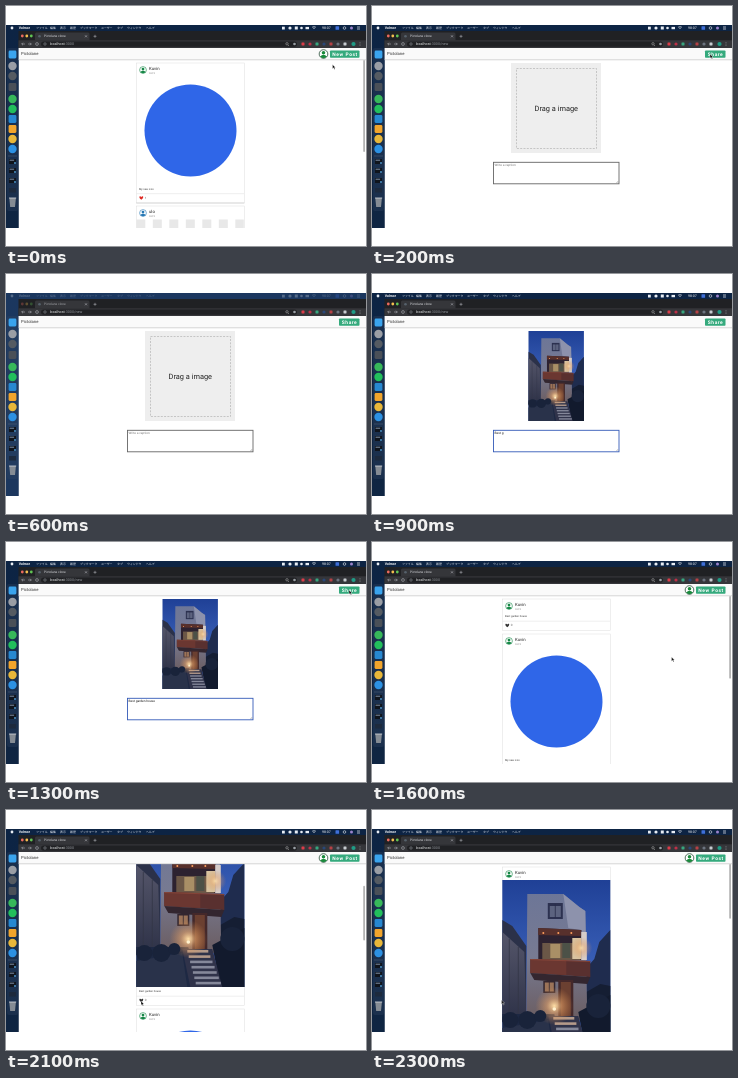
Recreate the animation shown at these times as an HTML page. Size 360 by 240 pixels, loop 2400 ms.

```html
<!DOCTYPE html>
<html lang="ja">
<head>
<meta charset="utf-8">
<title>Photo feed demo</title>
<style>
  html, body { margin: 0; width: 100%; height: 100%; overflow: hidden; background: #fff; }
  svg { display: block; width: 360px; height: 240px; }
  text { font-family: Roboto, "Noto Sans CJK JP", "Noto Sans CJK", sans-serif; text-rendering: geometricPrecision; }
  .mid { text-anchor: middle; }
  .bold { font-weight: 700; }
</style>
</head>
<body>
<svg id="stage" viewBox="0 0 360 240" xmlns="http://www.w3.org/2000/svg"></svg>
<script>
const STEP = 100, STEPS = 24;
const stage = document.getElementById('stage');

// Markup helpers
const rect = (x, y, w, h, fill, more = '') => `<rect x="${x}" y="${y}" width="${w}" height="${h}" fill="${fill}" ${more}/>`;
const dot = (x, y, r, fill, more = '') => `<circle cx="${x}" cy="${y}" r="${r}" fill="${fill}" ${more}/>`;
const poly = (points, fill) => `<polygon points="${points}" fill="${fill}"/>`;
const line = (d, stroke, w = .6) => `<path d="${d}" fill="none" stroke="${stroke}" stroke-width="${w}"/>`;
const text = (x, y, size, fill, str, cls = '', more = '') =>
  `<text x="${x}" y="${y}" font-size="${size}" fill="${fill}" class="${cls}" ${more}>${str}</text>`;
const group = (id, body, more = '') => `<g id="${id}" ${more}>${body}</g>`;
const stops = colors => colors.map((c, i) => `<stop offset="${i / (colors.length - 1)}" stop-color="${c}"/>`).join('');
const gradient = (id, ...colors) => `<linearGradient id="${id}" x2="0" y2="1">${stops(colors)}</linearGradient>`;

const avatar = (x, y, r, color, ring = color) =>
  dot(x, y, r * .92, '#fff', `stroke="${ring}" stroke-width="${r * .16}"`) + dot(x, y - r * .25, r * .38, color) +
  `<path d="M${x - r * .72} ${y + r * .55}Q${x} ${y - r * .2} ${x + r * .72} ${y + r * .55}Q${x} ${y + r * 1.25} ${x - r * .72} ${y + r * .55}" fill="${color}"/>`;

const heart = (x, y, id = '', fill = '#333') =>
  `<path id="${id}" transform="translate(${x} ${y})" d="M0 1.8C-3.4-.4-1.6-2.8 0-1C1.6-2.8 3.4-.4 0 1.8Z" fill="${fill}"/>`;

// Evening house, 108 x 174
function house() {
  let s = rect(0, 0, 108, 174, 'url(#sky)');
  // neighbours
  s += poly('0,40 10,46 24,66 24,142 0,142', '#2b3149') + poly('0,52 22,72 24,142 0,142', 'url(#side)');
  s += line('M7 59V140M16 67V140', '#343747', .8);
  s += poly('84,88 92,79 97,62 108,50 108,174 84,174', '#1f2c4e') + poly('84,112 98,104 108,106 108,174 84,174', '#151e33');
  // facade
  s += poly('25,14 61,14 77,27 83,31 85,140 24,140', 'url(#wall)');
  s += poly('61,14 77,27 83,31 84,80 78,80 78,50 66,48', '#8d92ac');
  s += rect(45.5, 23, 15, 16, '#2c3150') + rect(47.5, 26, 11, 11, '#5c637f') + line('M53 24V38', '#2a2e4b', .8);
  // lit balcony
  s += poly('36,48 79,50 79,80 36,80', '#2d2230') + poly('36,48 79,50 79,56 36,55', '#57302c');
  s += rect(40, 63, 38, 17, '#6b5747') + rect(48, 64, 10, 14, '#a98f66') + rect(60, 63, 8, 15, '#4c5147');
  s += rect(70, 58, 9, 21, '#d8c3a0') + rect(79, 52, 5.5, 28, '#d6cdc9') + dot(79, 68, 11, 'url(#glow)', 'opacity=".8"');
  for (const x of [41, 56, 69]) s += dot(x, 53, 1, '#ff9e5c');
  s += poly('28,79 88,81 88,97 28,93', '#59302f') + poly('28,79 64,80 64,95 28,93', '#6b3731');
  s += line('M28 79.5L88 81.5', '#8d4a3c', .8) + poly('28,93 88,97 85,104 32,100', '#33262f');
  // ground floor
  s += rect(41, 101, 12, 12, '#33262f') + rect(42.5, 102.5, 9, 9, '#9b7358') + line('M47 102V112', '#33262f', .8);
  s += rect(56, 100, 15, 38, '#44282a') + rect(58.5, 102, 10, 35, '#6b4031');
  // garden and stairs
  s += poly('0,134 52,134 60,174 0,174', '#1d2843') + poly('76,132 108,115 108,174 84,174', '#121a2d');
  s += poly('0,148 46,140 51,174 0,174', '#29324a') + poly('46,136 76,136 86,174 54,174', '#30334a');
  for (let i = 0; i < 7; i++) s += rect(51 + i * 1.4, 137 + i * 5.3, 21 + i * .7, 2.6, i < 2 ? '#b49a8a' : '#85889a');
  s += dot(52, 126, 19, 'url(#glow)') + dot(52, 129, 1.8, '#fff1ce');
  for (const [x, y, r] of [[8, 140, 8], [25, 140, 9], [38, 136, 6], [96, 126, 12]]) s += dot(x, y, r, '#19233a');
  return s;
}

// Parts of a card, with y measured from the card's top edge
const cardHead = (name, color) =>
  avatar(137, 7, 3.7, color) + text(143, 6.9, 4.3, '#222', name) + text(143, 10.8, 2.5, '#777', 'Oct 5');
const cardFoot = (caption, likes, id, fill) =>
  text(133, 5.3, 2.65, '#333', caption) + line('M130.5 9.2H238', '#ddd', .5) +
  heart(135.3, 13.4, id, fill) + text(138.7, 14.4, 3, '#555', likes);
const frame = h => rect(130.3, 0, 108, h, '#fff', 'stroke="#ddd" stroke-width=".5"') + line(`M130.3 ${h}H238.3`, '#bbb', .5);

function feed() {
  const fresh = `<rect id="cardBox" x="130.3" y="0" width="108" height="32" fill="#fff" stroke="#ddd" stroke-width=".5"/>` +
    cardHead('Kuvin', '#168746') + `<use id="bigPhoto" href="#house" x="130.3" y="13"/>` +
    group('freshFoot', cardFoot('Best garden house', '0', 'freshHeart'));
  const older = frame(140) + cardHead('Kuvin', '#168746') + dot(184.5, 67.5, 46, '#2f66e8') +
    `<g transform="translate(0 121.5)">${cardFoot('My new icon', '1', 'oldHeart', '#df2b25')}</g>`;
  let last = frame(140) + cardHead('ulo', '#2678b5');
  for (let i = 0; i < 7; i++) last += rect(130.3 + i * 16.5, 13.5, i < 6 ? 9 : 8.5, 9, '#e8e8e8');
  return group('fresh', fresh) + group('older', older) + group('last', last);
}

function compose() {
  return group('drop',
      rect(139, 57, 90, 90, '#eee') +
      rect(144.5, 62.5, 80, 80, 'none', 'stroke="#aaa" stroke-width=".6" stroke-dasharray="2 1.3"') +
      text(184.3, 105.2, 7.4, '#222', 'Drag a image', 'mid')) +
    `<use id="preview" href="#house" transform="translate(156.5 57) scale(.513 .517)"/>` +
    rect(121.5, 156.3, 125.5, 21.5, '#fff', 'id="area" stroke-width=".9"') +
    text(122.5, 160.3, 3.2, '#777', '', '', 'id="caption"') +
    line('M244.3 177L246.3 175M245.5 177L246.3 176.2', '#777', .4);
}

function menuBar() {
  const items = [[30, 'ファイル'], [44, '編集'], [54, '表示'], [64, '履歴'], [74, 'ブックマーク'],
    [95, 'ユーザー'], [111, 'タブ'], [121, 'ウィンドウ'], [140, 'ヘルプ']];
  let s = dot(6, 22, 1.4, '#e8edf4') + text(12.7, 23.3, 3.5, '#fff', 'Velmor', 'bold');
  for (const [x, str] of items) s += text(x, 23.2, 2.9, '#eef2f8', str);
  s += rect(276, 20.7, 2.8, 2.8, '#e8edf4') + dot(284, 22, 1.6, '#e8edf4') + rect(288.8, 20.5, 3, 3, '#e8edf4');
  s += dot(295.5, 22, 1.3, '#e8edf4') + rect(299.5, 20.9, 3.5, 2.3, '#e8edf4');
  s += line('M306 21.3Q308 19.8 310 21.3M307 22.4Q308 21.7 309 22.4', '#e8edf4');
  s += text(316, 23.3, 3.5, '#fff', '98:07');
  s += rect(329.5, 20.2, 3.6, 3.6, '#3f6fd8', 'rx=".6"') + dot(338.5, 22, 1.3, 'none', 'stroke="#e8edf4" stroke-width=".6"');
  return s + dot(345.5, 22, 1.5, '#9a83cc') + line('M351 20.8H354M351 22H354M351 23.2H354', '#e8edf4', .5);
}

function dock() {
  const circles = [[60, '#9a9ea5'], [70, '#555b62'], [93, '#37b85a'], [103, '#22bf5c'], [133, '#e8b73a'], [143, '#2c91e3']];
  const squares = [[48.5, '#3aa4ee'], [81, '#4a5058'], [113, '#2788d1'], [123, '#f2a52c']];
  let s = rect(1, 42, 11, 163, '#314661', 'rx="2" opacity=".35"');
  for (const [y, c] of circles) s += dot(6.5, y, 4.2, c);
  for (const [y, c] of squares) s += rect(2.6, y - 3.9, 7.8, 7.8, c, 'rx="1.3"');
  s += line('M2 150H11', '#617087', .4);
  for (const y of [153, 162, 172]) s += rect(3, y, 7, 5, '#10151d') + rect(3.6, y + .7, 4.5, 1, '#7c8da4') + dot(9, y + 4, 1, '#4a93ca');
  s += rect(3, 182, 7, 4.5, '#1d2a3d');
  return s + poly('3.3,192 9.9,192 9,201 4.2,201', '#858c94') + line('M3 192H10.2', '#d5d9dd', .8);
}

function browser() {
  let s = rect(12.5, 25, 347.5, 17, '#202124') + `<path d="M29 34.5V28Q29 26.5 30.5 26.5H82Q83.5 26.5 83.5 28V34.5Z" fill="#35363a"/>`;
  s += rect(12.5, 34.3, 347.5, 7.7, '#35363a') + rect(35, 35.4, 256, 5.3, '#202124', 'rx="2.6"');
  s += group('lights', ['#ed6a5e', '#f4bf4f', '#61c554'].map((c, i) => dot(16.3 + i * 4.5, 30, 1.4, c)).join(''));
  s += dot(33.5, 30.3, 1.3, '#56616b') + text(38, 31.3, 3.2, '#dfe1e5', 'Pictolane clone', '', 'id="tab"');
  s += line('M79 29.3L81 31.3M81 29.3L79 31.3M87.5 30.3H90.5M89 28.8V31.8', '#c0c3c8', .5);
  s += line('M19 38H15.7L17 36.7M15.7 38L17 39.3M22 38H25.3L24 36.7M25.3 38L24 39.3', '#c0c3c8', .5);
  s += dot(31, 38, 1.4, 'none', 'stroke="#c0c3c8" stroke-width=".5"') + dot(39, 38, 1.2, 'none', 'stroke="#9ba0a6" stroke-width=".5"');
  s += `<text x="43.7" y="39.3" font-size="3.7" fill="#f1f3f4">localhost<tspan id="path" fill="#92979d"></tspan></text>`;
  s += dot(281, 37.8, 1.2, 'none', 'stroke="#bbb" stroke-width=".5"') + line('M282 39L283 40', '#bbb', .5) + dot(288.5, 38, 1.3, '#9aa0a6');
  ['#dc3c49', '#be3047', '#37a67e', '#294777', '#b64145', '#6c7480', '#c7cbd0'].forEach((c, i) => {
    const x = 297 + i * 7;
    s += i % 2 ? dot(x, 38, 1.6, c) : rect(x - 1.5, 36.5, 3, 3, c, 'rx=".4"');
  });
  s += dot(347.5, 38, 2.1, '#1f9c86');
  for (const y of [36.6, 38, 39.4]) s += dot(354, y, .4, '#c0c3c8');
  return s;
}

const button = (x, w, str, size) => rect(x, 44.4, w, 7.3, '#35aa7d', 'rx=".8"') +
  text(x + w / 2 + .3, 49.9, size, '#fff', str, 'mid bold', 'letter-spacing=".55"');

function header() {
  return rect(12.5, 42, 347.5, 12, '#fafafa') + line('M12.5 53.8H360', '#bbb', .6) +
    text(15, 49.4, 4.2, '#333', 'Pictolane') +
    group('feedTools', avatar(317.5, 48, 4.7, '#1a8a3c', '#17402a') + button(324, 29.5, 'New Post', 4.9)) +
    group('shareTool', button(333, 20.5, 'Share', 4.9));
}

stage.innerHTML = `<defs>${gradient('sky', '#1f4096', '#3a60b8', '#3a60b8')}${gradient('wall', '#6d7697', '#777a92', '#6b5d61')}
  ${gradient('side', '#55566a', '#2d3147')}${gradient('desk', '#0d2444', '#0f2542')}
  <radialGradient id="glow"><stop stop-color="#ffe0a8"/><stop offset=".4" stop-color="#e8a468" stop-opacity=".55"/><stop offset="1" stop-color="#d88b4c" stop-opacity="0"/></radialGradient>
  <clipPath id="pageClip"><rect x="12.5" y="42" width="347.5" height="180"/></clipPath>
  <g id="house">${house()}</g></defs>` +
  rect(0, 0, 360, 240, '#fff') + rect(0, 19, 360, 203, 'url(#desk)') +
  rect(0, 19, 360, 203, '#2b4a7b', 'id="haze" opacity=".5"') +
  group('menu', menuBar()) + dock() + browser() +
  group('page', rect(12.5, 42, 347.5, 180, '#fff') + group('feed', feed()) + group('compose', compose()) + header() +
    rect(357.2, 54, 1.8, 78, '#b4b4b4', 'id="bar" rx=".9"'), 'clip-path="url(#pageClip)"') +
  `<path id="pointer" d="M0 0V4.2L1.1 3.3L1.9 4.9L2.6 4.5L1.9 3H3Z" fill="#111" stroke="#fff" stroke-width=".35"/>`;

const el = {};
for (const node of stage.querySelectorAll('[id]')) el[node.id] = node;
const set = (id, values) => { for (const k in values) el[id].setAttribute(k, values[k]); };
const show = (id, on) => set(id, { display: on ? 'inline' : 'none' });
const shift = (id, y) => set(id, { transform: `translate(0 ${y})` });

// [step, x, y] with straight moves between
const pointerPath = [[0, 326.5, 58.5], [2, 338, 48], [12, 260, 130], [13, 343, 48], [14, 342, 49],
  [16, 299.5, 115], [18, 149.5, 108.5], [21, 135, 191], [22, 135, 191], [23, 129.5, 190]];
const scrollAt = { 19: 20, 20: 52, 21: 67, 22: 67 };
const typed = { 9: 6, 10: 11, 11: 14 };

function pointerAt(k) {
  const i = Math.max(1, pointerPath.findIndex(p => p[0] >= k));
  const [a, ax, ay] = pointerPath[i - 1], [b, bx, by] = pointerPath[i];
  const u = (k - a) / (b - a);
  return [ax + (bx - ax) * u, ay + (by - ay) * u];
}

function draw(k) {
  const writing = k >= 2 && k < 14, posted = k >= 14, loaded = k >= 17;
  const away = k >= 3 && k < 7, dropped = k >= 7, scroll = scrollAt[k] || 0;

  show('haze', away);
  set('menu', { opacity: away ? .28 : 1 });
  set('lights', { opacity: away ? .3 : 1 });
  set('tab', { opacity: away ? .65 : 1 });
  el.path.textContent = writing ? ':3000/new' : ':3000';

  show('feed', !writing);
  show('feedTools', !writing);
  show('compose', writing);
  show('shareTool', writing);

  show('drop', !dropped);
  show('preview', dropped);
  const count = k < 9 ? 0 : typed[k] || 17;
  el.caption.textContent = count ? 'Best garden house'.slice(0, count) : 'Write a caption';
  set('caption', { fill: count ? '#111' : '#777' });
  set('area', { stroke: k >= 8 ? '#355bb8' : '#666' });

  const photo = loaded ? 174 : 0, top = 57 - scroll;
  const next = posted ? top + photo + 35 : top;
  show('fresh', posted);
  show('bigPhoto', loaded);
  show('last', !posted);
  shift('fresh', top);
  shift('freshFoot', 13 + photo);
  set('cardBox', { height: 31.5 + photo });
  set('freshHeart', { fill: k >= 22 ? '#df2b25' : '#333' });
  shift('older', next);
  shift('last', next + 143);

  // scrollbar thumb shrinks as the feed grows
  const view = 168, total = 307 + (posted ? 35 : 0) + photo;
  show('bar', !writing);
  set('bar', { y: 54 + scroll * view / total, height: view * view / total });

  const [x, y] = pointerAt(k);
  show('pointer', k < 3 || k >= 12);
  set('pointer', { transform: `translate(${x} ${y})` });
}

const start = performance.now();
function tick() {
  draw(Math.floor((performance.now() - start) / STEP) % STEPS);
  requestAnimationFrame(tick);
}
tick();
</script>
</body>
</html>
```
